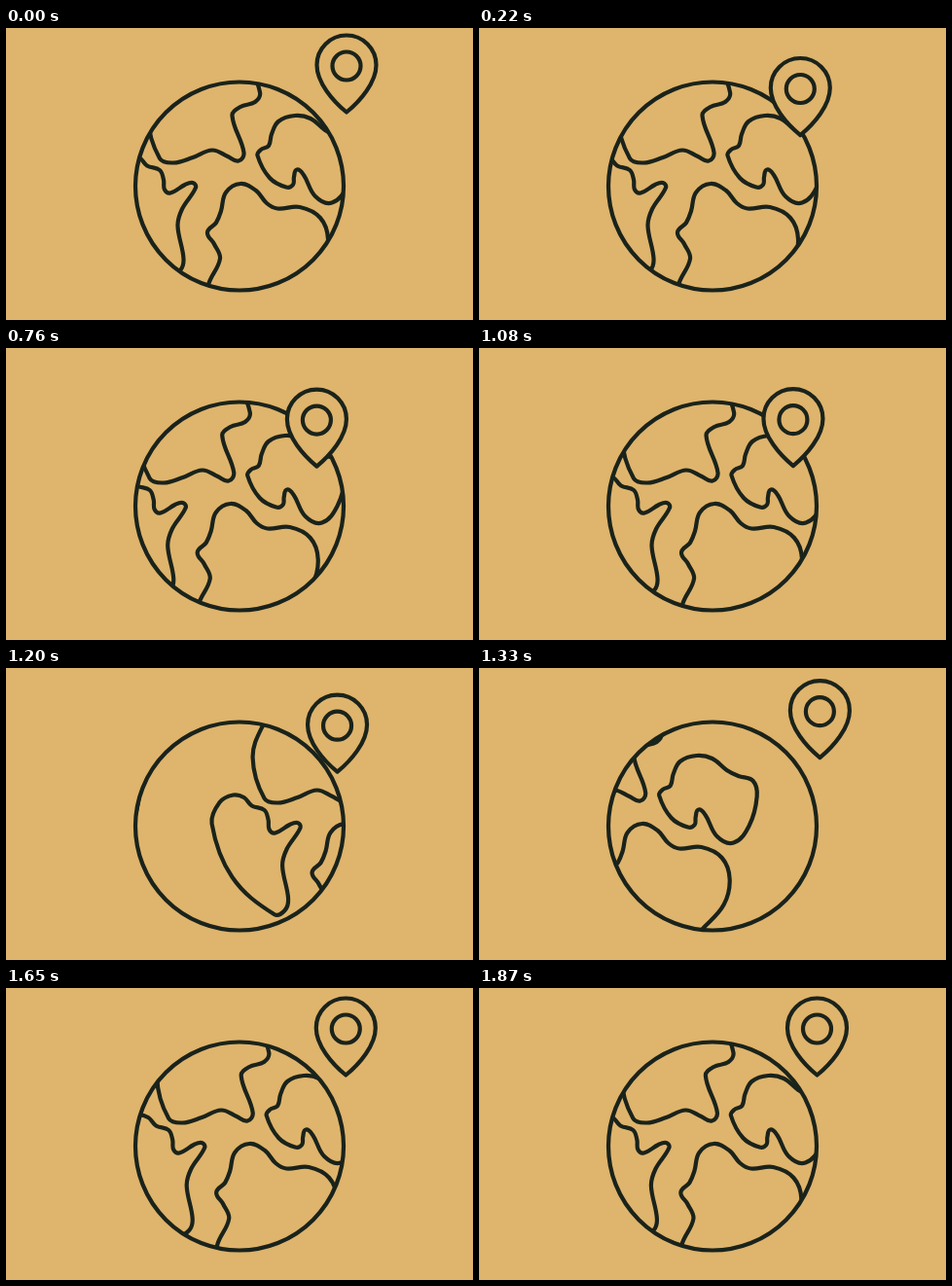
Animation of 480x300 px, one loop 1.9 s. Source, as an HTML page with a canvas:

```html
<!DOCTYPE html>
<html lang="en">
<head>
<meta charset="utf-8">
<title>Globe and pin</title>
<style>
html, body { margin: 0; width: 100%; height: 100%; overflow: hidden; background: #dfb46c; }
canvas { display: block; width: 480px; height: 300px; }
</style>
</head>
<body>
<canvas id="stage" width="480" height="300"></canvas>
<script>
const ctx = document.getElementById('stage').getContext('2d');
const LOOP = 1900, TURN = 330, DRIFT = 0.0135;
const SAND = '#dfb46c', INK = '#1a231b';
const GLOBE = { x: 240, y: 162.5, r: 107 };

// Eased step from 0 to 1 between two times
function glide(t, from, to) {
  const u = Math.min(1, Math.max(0, (t - from) / (to - from)));
  return u * u * (3 - 2 * u);
}

// Slow drift left, one fast turn right, small overshoot
function globeShift(t) {
  const overshoot = glide(t, 1330, 1490) - glide(t, 1490, 1870);
  return (TURN + DRIFT * LOOP) * glide(t, 1025, 1468) - DRIFT * t + 9.5 * overshoot;
}

// Drop onto the globe, lift off during the turn, then settle
function pinPlace(t) {
  const drop = glide(t, 0, 370);
  return {
    x: 350 - 30.6 * drop + 31 * glide(t, 1020, 1310) - 2.9 * glide(t, 1490, 1870),
    y: 39 + 36.5 * drop - 1.4 * glide(t, 440, 760)
      - 29.5 * glide(t, 1060, 1340) - 2.6 * glide(t, 1300, 1650)
  };
}

// Closed smooth outline through a few points
function blob(text) {
  const pts = text.split(' ').map(p => p.split(',').map(Number));
  const n = pts.length;
  const dirs = pts.map((p, i) => {
    const a = pts[(i + n - 1) % n], b = pts[(i + 1) % n];
    const len = Math.hypot(b[0] - a[0], b[1] - a[1]);
    return [(b[0] - a[0]) / len, (b[1] - a[1]) / len];
  });
  const path = new Path2D();
  path.moveTo(...pts[0]);
  for (let i = 0; i < n; i++) {
    const j = (i + 1) % n, p = pts[i], q = pts[j];
    const h = 0.36 * Math.hypot(q[0] - p[0], q[1] - p[1]);
    path.bezierCurveTo(p[0] + dirs[i][0] * h, p[1] + dirs[i][1] * h,
      q[0] - dirs[j][0] * h, q[1] - dirs[j][1] * h, q[0], q[1]);
  }
  path.closePath();
  return path;
}

function circle(x, y, r) {
  const path = new Path2D();
  path.arc(x, y, r, 0, 2 * Math.PI);
  return path;
}

const north = blob('172,40 156,60 146,92 158,134 172,138.5 192,133 212,125.5 228,132 239,136.5 244.5,128 232.5,90 241,81 256,76 261,66 250,48');
const west = blob('104,160 112,138 126,130.5 137,133 145,141.5 158,146 162,156 163,166 169,169.5 184,161 192,159 195,164 181,186 176.5,203 182.5,237 179,249 168,253 125,215');
const east = blob('258.5,131 262,125 270,121 273,109 280,96 297,90 313,93 328,105 340,111 355,116 359,132 351,162 335,179.5 318,173 306,151 299,145.5 296,153 295,161 288,163.5 271,154');
const south = blob('207,290 208,264 220,237 214,222 207,210 216,200 221,188 226,169 241,160 257,167 268,180 279,185.5 302,184 323,195 331,217 325,243 305,266 280,290');
const lands = [north, west, east, south];

const disc = circle(GLOBE.x, GLOBE.y, GLOBE.r);
const ring = circle(0, 0, 14.5);
const pin = new Path2D('M0 47.5C-14 36-30.5 17-30.5-1A30.5 30.5 0 0 1 30.5-1C30.5 17 14 36 0 47.5Z');

function drawGlobe(shift) {
  ctx.save();
  ctx.clip(disc);
  for (const dx of [shift, shift - TURN]) {
    ctx.save();
    ctx.translate(dx, 0);
    lands.forEach(land => ctx.stroke(land));
    ctx.restore();
  }
  ctx.restore();
  ctx.stroke(disc);
}

function drawPin({ x, y }) {
  ctx.save();
  ctx.translate(x, y);
  ctx.fill(pin);
  ctx.stroke(pin);
  ctx.stroke(ring);
  ctx.restore();
}

function draw(t) {
  ctx.fillStyle = SAND;
  ctx.strokeStyle = INK;
  ctx.lineWidth = 4.2;
  ctx.lineJoin = 'round';
  ctx.fillRect(0, 0, 480, 300);
  drawGlobe(globeShift(t));
  drawPin(pinPlace(t));
}

const start = performance.now();
function tick() {
  draw((performance.now() - start) % LOOP);
  requestAnimationFrame(tick);
}
tick();
</script>
</body>
</html>
```
